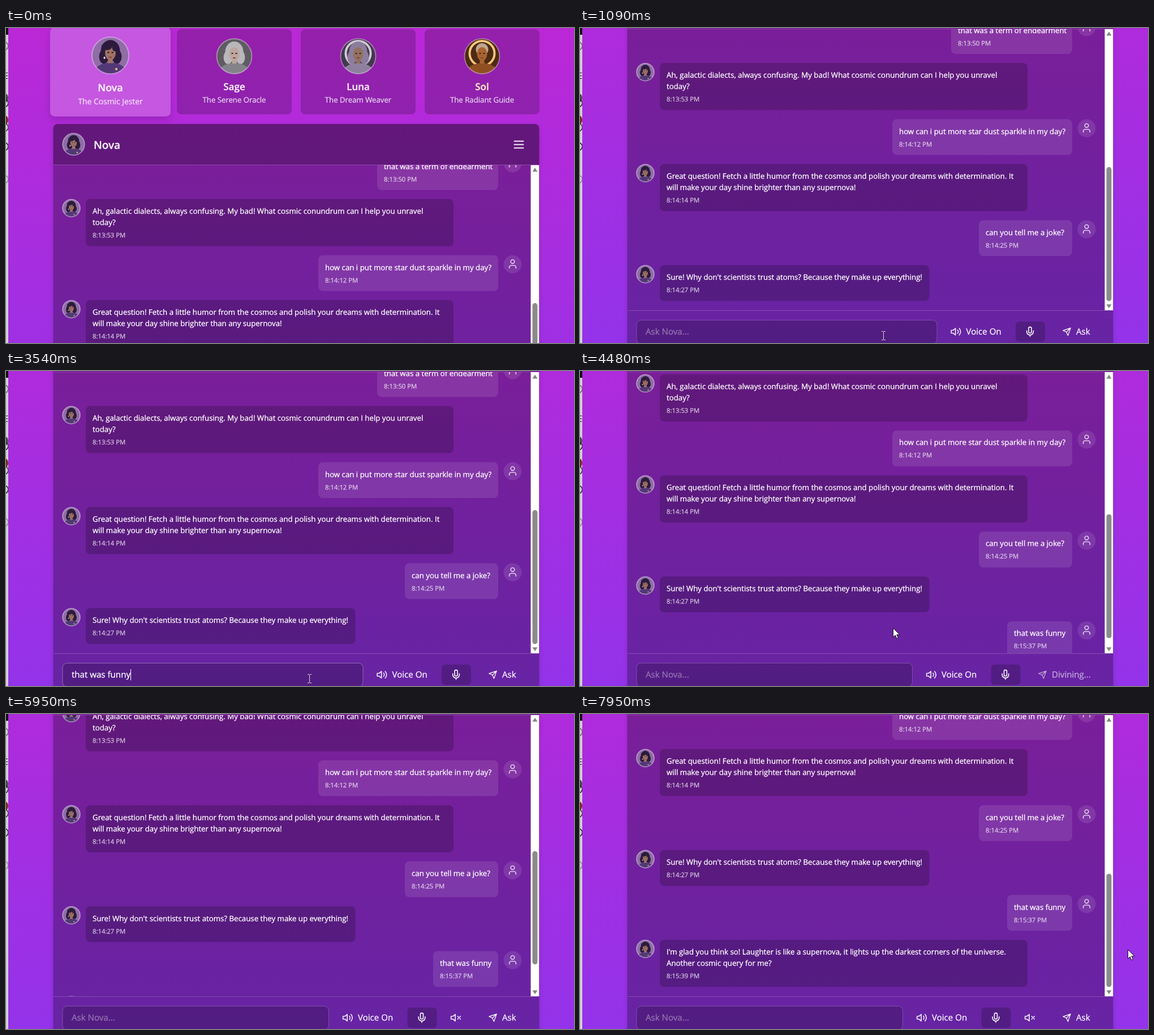
Write an HTML page with a canvas that moves like this. It is 1004 px wide and 558 px high and loops after 8000 ms.

```html
<!DOCTYPE html>
<html lang="en">
<head>
<meta charset="utf-8">
<title>Cosmic chat</title>
<style>
html, body { margin: 0; width: 100%; height: 100%; overflow: hidden; background: #9333ea; }
canvas { display: block; }
</style>
</head>
<body>
<canvas id="stage" width="1004" height="558"></canvas>
<script>
const ctx = document.getElementById('stage').getContext('2d');
const LOOP = 8000;
const white = a => `rgba(255,255,255,${a})`;
const black = a => `rgba(0,0,0,${a})`;

// Messages: [own, left, right, lines, time]
const messages = [
  [1, 656, 870, ['that was a term of endearment'], '8:13:50 PM'],
  [0, 141, 791, ['Ah, galactic dialects, always confusing. My bad! What cosmic conundrum can I help you unravel', 'today?'], '8:13:53 PM'],
  [1, 552, 870, ['how can i put more star dust sparkle in my day?'], '8:14:12 PM'],
  [0, 141, 791, ['Great question! Fetch a little humor from the cosmos and polish your dreams with determination. It', 'will make your day shine brighter than any supernova!'], '8:14:14 PM'],
  [1, 705, 870, ['can you tell me a joke?'], '8:14:25 PM'],
  [0, 141, 617.5, ["Sure! Why don't scientists trust atoms? Because they make up everything!"], '8:14:27 PM'],
  [1, 755, 870, ['that was funny'], '8:15:37 PM'],
  [0, 141, 791, ["I'm glad you think so! Laughter is like a supernova, it lights up the darkest corners of the universe.", 'Another cosmic query for me?'], '8:15:39 PM']
];
const SENT = 3680, REPLY = 5950, FOCUS = 1230;
const typed = 'that was funny';
const keyTimes = [1790, 1890, 1990, 2080, 2220, 2320, 2410, 2550, 2680, 2820, 2950, 3150, 3280, 3540];

const looks = {
  Nova: { bg: '#8f6da6', hair: '#2c1b3c', skin: '#9f7264', cloth: '#533878' },
  Sage: { bg: '#5f5b62', hair: '#b9b7bb', skin: '#bda69e', cloth: '#85838a' },
  Luna: { bg: '#43384e', hair: '#8c7d9c', skin: '#94705f', cloth: '#8f80a0', ring: '#d3c7da' },
  Sol: { bg: '#4d2a12', hair: '#bfa68e', skin: '#a8642f', cloth: '#8f4f22', ring: '#f5c67c' }
};
const cards = [['Nova', 'The Cosmic Jester'], ['Sage', 'The Serene Oracle'],
  ['Luna', 'The Dream Weaver'], ['Sol', 'The Radiant Guide']];

// Icons on a 24-unit grid
const horn = 'M11 5 6 9H2v6h4l5 4Z';
const icons = {
  user: 'M19 21v-2a4 4 0 0 0-4-4H9a4 4 0 0 0-4 4v2M16 7a4 4 0 1 1-8 0 4 4 0 0 1 8 0',
  sound: horn + 'M15.5 8.5a5 5 0 0 1 0 7M19 5a10 10 0 0 1 0 14',
  mute: horn + 'M22 9l-6 6M16 9l6 6',
  mic: 'M12 2a3 3 0 0 0-3 3v7a3 3 0 0 0 6 0V5a3 3 0 0 0-3-3ZM19 10v2a7 7 0 0 1-14 0v-2M12 19v3',
  send: 'M22 2 11 13M22 2l-7 20-4-9-9-4Z',
  menu: 'M4 6h16M4 12h16M4 18h16'
};

// Cursor path: [time, x, y]
const path = [
  [0, 600, 600], [270, 595, 558], [600, 570, 465], [996, 536, 545],
  [4214, 536, 545], [4610, 561, 410],
  [5094, 561, 410], [5292, 881, 411], [5424, 881, 411], [5556, 989, 432], [5622, 1010, 436],
  [6671, 1010, 436], [6672, 920, 430], [6870, 856, 407],
  [7604, 856, 407], [7802, 966, 413], [7868, 966, 413], [7934, 968, 417], [LOOP, 968, 417]
];

function tick(t) {
  if (t < 270) return 0;
  const s = [7670, 6672, 5490, 5160, 4214, 270].find(v => v <= t);
  return s + Math.floor((t - s) / 66) * 66;
}
function ease(t, a, b) {
  const u = Math.min(1, Math.max(0, (t - a) / (b - a)));
  return u * u * (3 - 2 * u);
}

function box(x, y, w, h, r, fill, line) {
  ctx.beginPath();
  ctx.roundRect(x, y, w, h, r);
  if (fill) { ctx.fillStyle = fill; ctx.fill(); }
  if (line) { ctx.strokeStyle = line; ctx.lineWidth = 1; ctx.stroke(); }
}
function disc(x, y, rx, ry, fill) {
  ctx.beginPath();
  ctx.ellipse(x, y, rx, ry, 0, 0, 7);
  ctx.fillStyle = fill;
  ctx.fill();
}
// A hairline outline gives the sturdier strokes of screen-hinted type
function text(s, x, y, size, color, weight = 400, align = 'left') {
  ctx.font = `${weight} ${size}px "Open Sans", "Noto Sans", sans-serif`;
  ctx.textAlign = align;
  ctx.fillStyle = ctx.strokeStyle = color;
  ctx.lineWidth = 0.3;
  ctx.lineJoin = 'round';
  ctx.fillText(s, x, y);
  ctx.strokeText(s, x, y);
}
function icon(name, cx, cy, size, color) {
  ctx.save();
  ctx.translate(cx - size / 2, cy - size / 2);
  ctx.scale(size / 24, size / 24);
  ctx.strokeStyle = color;
  ctx.lineWidth = 2;
  ctx.lineCap = ctx.lineJoin = 'round';
  ctx.stroke(new Path2D(icons[name]));
  ctx.restore();
}

function avatar(name, x, y, r) {
  const k = looks[name];
  ctx.save();
  ctx.translate(x, y);
  ctx.scale(r / 32, r / 32);
  ctx.save();
  ctx.beginPath();
  ctx.arc(0, 0, 31, 0, 7);
  ctx.clip();
  ctx.fillStyle = k.bg;
  ctx.fillRect(-32, -32, 64, 64);
  if (k.ring) {
    ctx.strokeStyle = k.ring;
    ctx.lineWidth = 4;
    ctx.beginPath();
    ctx.arc(0, -5, 22, 0, 7);
    ctx.stroke();
  }
  if (name === 'Sol') {
    disc(0, -12, 11, 11, k.hair);
  } else {
    disc(0, -8, 16, 18, k.hair);
    disc(-11, 2, 8, 12, k.hair);
    disc(11, 2, 8, 12, k.hair);
  }
  disc(0, 32, 29, 20, k.cloth);
  ctx.fillStyle = k.skin;
  ctx.fillRect(-4, 4, 8, 10);
  disc(0, -4, 9, 12, k.skin);
  disc(0, 18, 14, 5, k.cloth);
  disc(-3.5, -5, 1.8, 1, '#2a1a22');
  disc(3.5, -5, 1.8, 1, '#2a1a22');
  disc(0, 3, 2.6, 0.9, '#7a3a40');
  if (name === 'Nova') {
    disc(-6, -15, 9, 6, k.hair);
    disc(8, -13, 5, 6, k.hair);
    disc(-10, 4, 1.5, 2, '#f3d9ff');
    disc(10, 23, 2, 2, '#e4c46b');
  }
  ctx.restore();
  ctx.strokeStyle = white(0.4);
  ctx.lineWidth = 56 / r;
  ctx.beginPath();
  ctx.arc(0, 0, 31, 0, 7);
  ctx.stroke();
  ctx.restore();
}

function drawCards() {
  cards.forEach(([name, role], i) => {
    ctx.save();
    ctx.translate(184.5 + i * 219, 77.5);
    if (!i) {
      ctx.scale(1.05, 1.05);
      ctx.save();
      ctx.shadowColor = black(0.15);
      ctx.shadowBlur = 14;
      ctx.shadowOffsetY = 6;
      box(-101.5, -75.5, 203, 151, 8, '#b62dd9');
      ctx.restore();
    }
    box(-101.5, -75.5, 203, 151, 8, i ? black(0.2) : white(0.2));
    avatar(name, 0, -27.5, 32);
    text(name, 0, 32.5, 17, name === 'Sol' ? '#fdebc0' : white(0.93), 600, 'center');
    text(role, 0, 54.5, 13.2, white(0.75), 400, 'center');
    ctx.restore();
  });
}

function drawChat(count, scroll) {
  ctx.save();
  ctx.beginPath();
  ctx.rect(84, 243, 858.5, 498);
  ctx.clip();
  let y = 223.5 - scroll;
  for (const [own, left, right, lines, time] of messages.slice(0, count)) {
    const h = 43.5 + 20 * lines.length;
    box(left, y, right - left, h, 8, own ? white(0.1) : black(0.2));
    lines.forEach((s, i) => text(s, left + 12, Math.round(y + 26 + 20 * i), 13.26, '#fff'));
    text(time, left + 12, Math.round(y + h - 15.5), 11.3, white(0.66));
    if (own) {
      disc(895.5, y + 16, 16, 16, white(0.1));
      icon('user', 895.5, y + 15.5, 20, white(0.75));
    } else {
      avatar('Nova', 115.5, y + 16, 16);
    }
    y += h + 16;
  }
  // Scrollbar; 480 px of history lie above the first position
  const view = 499, track = 465, total = y - 742 + scroll + 480 + view;
  ctx.fillStyle = '#fff';
  ctx.fillRect(927.5, 243, 15, 498);
  box(930.5, 259 + track * (480 + scroll) / total, 9, track * view / total, 4.5, '#8b8b8b');
  ctx.fillStyle = '#858585';
  for (const [ty, d] of [[251.5, 1], [733.5, -1]]) {
    ctx.beginPath();
    ctx.moveTo(935, ty - 4 * d);
    ctx.lineTo(939.5, ty + 3 * d);
    ctx.lineTo(930.5, ty + 3 * d);
    ctx.fill();
  }
  ctx.restore();
}

function drawBar(t) {
  const waiting = t >= SENT && t < REPLY, replied = t >= REPLY;
  const focused = t >= FOCUS && t < SENT;
  const shift = waiting ? -43.5 : replied ? -60.5 : 0;
  const y = 779;
  box(100, 758.5, 531 + shift, 42, 8, black(0.2), white(focused ? 0.32 : 0.2));
  const entry = t < SENT ? typed.slice(0, keyTimes.filter(k => k <= t).length) : '';
  text(entry || 'Ask Nova...', 116, y + 5, 15.1, entry ? '#fff' : white(0.34));
  if (focused) {
    ctx.fillStyle = '#fff';
    ctx.fillRect(116 + (entry && ctx.measureText(entry).width), y - 10, 1, 20);
  }
  icon('sound', 664.5 + shift, y, 20, white(0.9));
  text('Voice On', 682.5 + shift, y + 5, 15.1, white(0.95));
  box(770 + shift, 761, 52, 36, 6, black(0.2));
  icon('mic', 795.5 + shift, y, 20, white(0.95));
  if (replied) icon('mute', 795, y, 20, white(0.9));
  const sendX = waiting ? 817.5 : 860.5, tone = white(waiting ? 0.56 : 0.95);
  icon('send', sendX, y, 16, tone);
  text(waiting ? 'Divining...' : 'Ask', sendX + 16.5, y + 5, 15.1, tone);
}

function drawPage(t, q) {
  const scroll = 79.5 * ease(q, 4190, 4640) + 99.5 * ease(q, 6750, 7030);
  const bg = ctx.createLinearGradient(0, -120, 0, 810);
  bg.addColorStop(0, '#c026d3');
  bg.addColorStop(1, '#9333ea');
  ctx.fillStyle = bg;
  ctx.fillRect(0, 0, 1004, 820);
  drawCards();
  ctx.save();
  ctx.shadowColor = black(0.12);
  ctx.shadowBlur = 10;
  ctx.shadowOffsetY = 4;
  box(83.5, 170, 859, 680, 8, bg);
  ctx.restore();
  box(83.5, 170, 859, 680, 8, black(0.3));
  box(83.5, 170, 859, 72, [8, 8, 0, 0], black(0.2));
  avatar('Nova', 119.5, 206, 20);
  text('Nova', 155, 214, 18.9, white(0.95), 600);
  icon('menu', 906.5, 206.5, 24, white(0.95));
  ctx.fillStyle = white(0.18);
  ctx.fillRect(84, 242, 858, 1);
  ctx.fillRect(84, 741, 858, 1);
  drawChat(t < SENT ? 6 : t < REPLY ? 7 : 8, scroll);
  drawBar(t);
}

// Sliver of the window behind
function drawEdge() {
  ctx.fillStyle = '#d2d0d2';
  ctx.fillRect(0, 0, 4, 558);
  ctx.fillStyle = '#111';
  ctx.fillRect(0, 0, 4, 12);
  for (const y of [79, 84, 89]) ctx.fillRect(0, y, 3, 1);
  ctx.save();
  ctx.beginPath();
  ctx.rect(0, 0, 4, 558);
  ctx.clip();
  disc(-2, 124, 6, 8, '#4a4a4c');
  disc(-2, 163, 6, 8, '#7d2a26');
  ctx.lineWidth = 1.5;
  for (const [y, c] of [[32, '#666'], [133, '#222'], [176, '#333'], [210, '#222'], [268, '#888']]) {
    ctx.strokeStyle = c;
    ctx.beginPath();
    ctx.arc(-3, y, 7, 0, 7);
    ctx.stroke();
  }
  ctx.restore();
}

function drawCursor(q) {
  const i = Math.max(1, path.findIndex(k => k[0] >= q));
  const [t0, x0, y0] = path[i - 1], [t1, x1, y1] = path[i];
  const u = (q - t0) / (t1 - t0), x = x0 + (x1 - x0) * u, y = y0 + (y1 - y0) * u;
  ctx.save();
  ctx.translate(Math.round(x), Math.round(y));
  if (q >= 990 && y > 517 && x < 631) {
    ctx.strokeStyle = '#cfdcc0';
    ctx.lineWidth = 1;
    ctx.stroke(new Path2D('M-3 -7.5H0M1 -7.5H4M.5 -7V7M-3 7.5H0M1 7.5H4'));
  } else {
    const arrow = new Path2D('M.5 .5V16.5L4.3 13 6.8 18.8 9.3 17.7 6.8 12H12Z');
    ctx.fillStyle = '#fff';
    ctx.fill(arrow);
    ctx.strokeStyle = '#111';
    ctx.lineWidth = 1;
    ctx.stroke(arrow);
  }
  ctx.restore();
}

function draw(t) {
  const q = tick(t);
  ctx.textRendering = 'geometricPrecision';
  ctx.save();
  ctx.translate(0, -Math.round(241 * ease(q, 212, 992)));
  drawPage(t, q);
  ctx.restore();
  drawEdge();
  drawCursor(q);
}

const start = performance.now();
function loop() {
  draw((performance.now() - start) % LOOP);
  requestAnimationFrame(loop);
}
loop();
</script>
</body>
</html>
```
